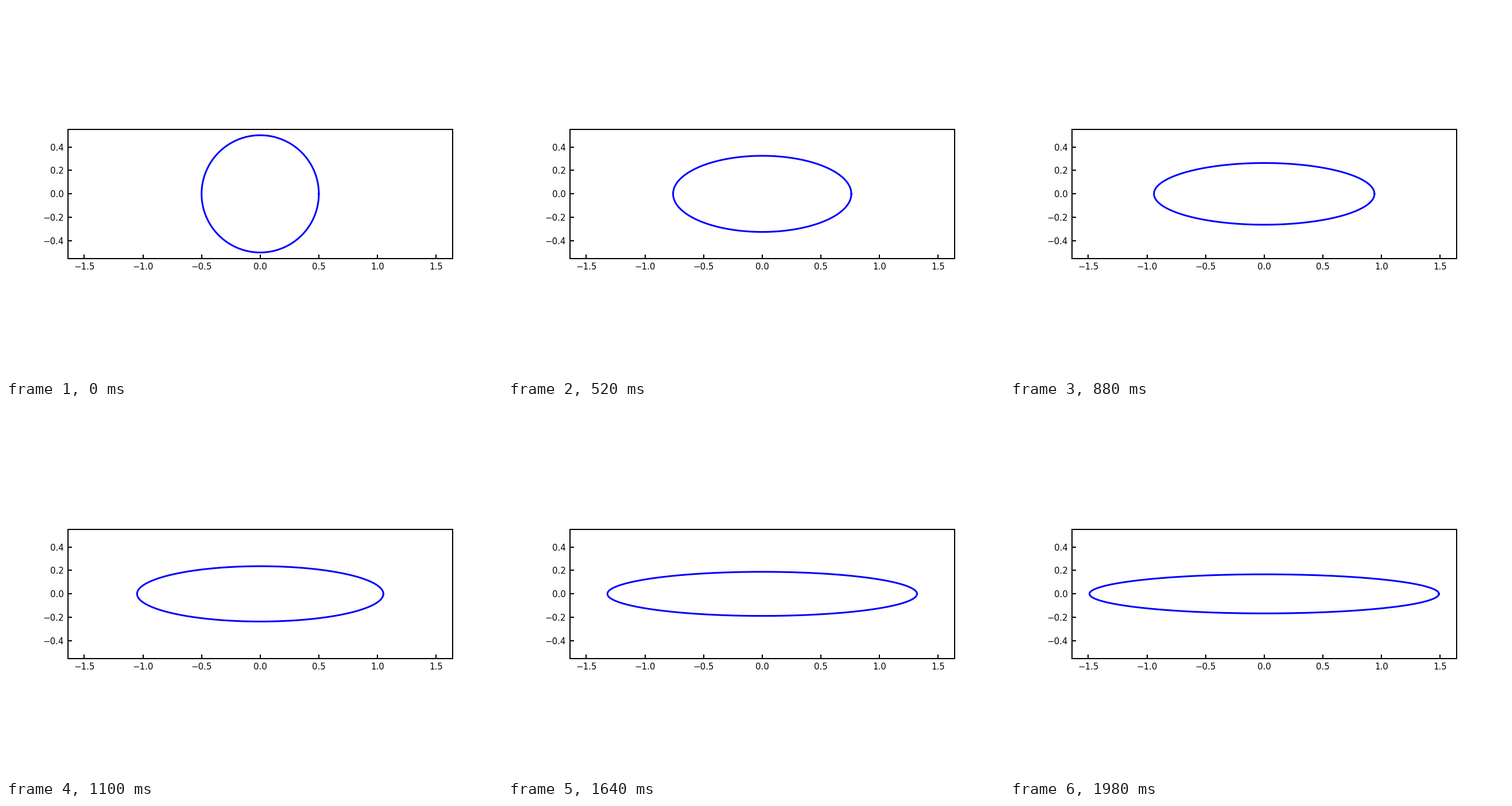
A matplotlib script that plays this animation: 864 px wide and 648 px high, repeating every 2000 ms.

```python
import numpy as np
import matplotlib.pyplot as plt
from matplotlib.animation import FuncAnimation

FRAMES = 100
INTERVAL = 20  # ms
RADIUS = 0.5
STEP = 0.01

plt.rcParams.update({
    "font.family": "DejaVu Sans",
    "font.size": 7.5,
    "axes.linewidth": 1.0,
    "xtick.direction": "in",
    "ytick.direction": "in",
    "xtick.major.width": 1.0,
    "ytick.major.width": 1.0,
})

theta = np.linspace(0, 2 * np.pi, 201)


def ellipse(n):
    """Stretch along x at constant speed, with the height one step ahead."""
    a = RADIUS + STEP * n
    b = RADIUS**2 / (a + STEP) if n else RADIUS
    return a * np.cos(theta), b * np.sin(theta)


fig, ax = plt.subplots(figsize=(6, 4.5), dpi=144)
ax.set_aspect("equal")
ax.set_xlim(-1.639, 1.639)
ax.set_ylim(-0.55, 0.55)
ax.set_xticks(np.arange(-1.5, 1.6, 0.5))
ax.set_yticks(np.arange(-2, 3) * 0.2)
line, = ax.plot(*ellipse(0), color="blue", lw=1.5)


def update(n):
    line.set_data(*ellipse(n))
    return line,


anim = FuncAnimation(fig, update, frames=FRAMES, interval=INTERVAL,
                     repeat=True, repeat_delay=0)
plt.show()
```
